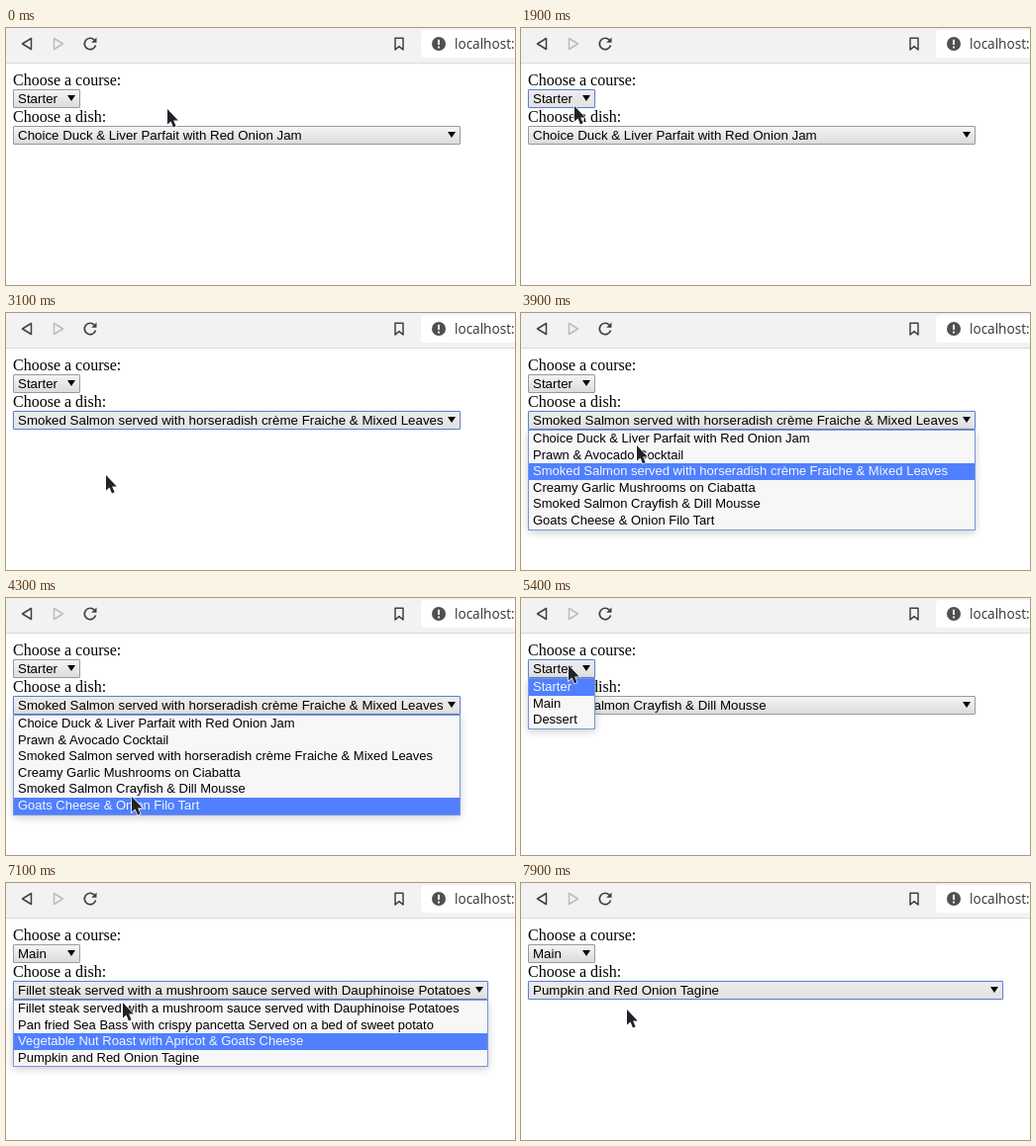
Write an HTML page that moves like this. It is 514 px wide and 260 px high and loops after 8 s.

```html
<!DOCTYPE html>
<html lang="en">
<head>
<meta charset="utf-8">
<title>Dependent menus</title>
<style>
html, body { margin: 0; width: 100%; height: 100%; overflow: hidden; background: #fff; }
body { position: relative; color: #000; }
body > * { position: absolute; }
#bar { left: 0; top: 0; }
#host { left: 453px; top: 6px; font: 13.6px/20px "Open Sans", sans-serif; color: #333; white-space: nowrap; }
.label { left: 7px; font: 16px/18px "Liberation Serif", serif; white-space: nowrap; }
.select, .popup { left: 7px; box-sizing: border-box; white-space: nowrap; font-family: "Liberation Sans", sans-serif; }
.select {
  height: 19px; padding-left: 4px; font-size: 13.333px; line-height: 17px;
  border: 1px solid #999; border-radius: 1px;
  background: linear-gradient(#f4f4f4, #dcdcdc);
}
.select.hover { background: linear-gradient(#f8f8f8, #e3e3e3); }
.select.focus { border-color: #5f7fd0; box-shadow: 0 0 1px #6f8fe0; background: linear-gradient(#ececec, #e2e2e2); }
.select::after {
  content: ""; position: absolute; right: 4px; top: 5px; width: 8px; height: 6px;
  background: #000; clip-path: polygon(0 0, 100% 0, 50% 100%);
}
.popup {
  border: 1px solid #7c93d8; background: #f7f7f7; font-size: 13px;
  box-shadow: 0 2px 8px rgba(0, 0, 0, .2);
}
.popup div { height: 16.6px; line-height: 16.6px; padding-left: 4px; }
.popup .on { background: #5080ff; color: #f4f6ff; }
#cursor { left: 0; top: 0; overflow: visible; }
</style>
</head>
<body>
<svg id="bar" width="514" height="36" fill="none" stroke="#404040" stroke-width="1.5">
  <path d="M0 0H514V35H0Z" fill="#f2f2f2" stroke="none"/>
  <path d="M514 2H423q-4 0 -4 4V26q0 4 4 4H514Z" fill="#fff" stroke="none"/>
  <path d="M0 35.5H514" stroke="#d9d9d9" stroke-width="1"/>
  <path d="M25.5 10.5V21.5L16.5 16Z" stroke-linejoin="round"/>
  <path d="M48.5 10.5V21.5L57.5 16Z" stroke="#bcbcbc" stroke-linejoin="round"/>
  <path d="M89.3 12.2A5.7 5.7 0 1 0 90.5 17.5" stroke-width="1.7"/>
  <path d="M91.5 9.5V14.8H86.2Z" fill="#404040" stroke="none"/>
  <path d="M393 10.2H401V22L397 18.6L393 22Z" stroke-linejoin="round"/>
  <circle cx="437" cy="16" r="7" fill="#505050" stroke="none"/>
  <path d="M437 11.8V17M437 18.6V20.4" stroke="#fff" stroke-width="1.8"/>
</svg>
<div id="host">localhost:</div>
<div class="label" style="top:44px">Choose a course:</div>
<div class="label" style="top:81px">Choose a dish:</div>
<div class="select" style="top:62px"></div>
<div class="select" style="top:99px"></div>
<div class="popup"></div>
<svg id="cursor" width="12" height="20">
  <path d="M0 0V15.6L3.5 12.4L6 18.4L8.6 17.3L6.1 11.5H10.8Z" fill="#20242a" stroke="#fff" stroke-width="1.4" paint-order="stroke"/>
</svg>
<script>
const courses = ["Starter", "Main", "Dessert"];
const menus = [
  ["Choice Duck & Liver Parfait with Red Onion Jam", "Prawn & Avocado Cocktail",
   "Smoked Salmon served with horseradish crème Fraiche & Mixed Leaves",
   "Creamy Garlic Mushrooms on Ciabatta", "Smoked Salmon Crayfish & Dill Mousse",
   "Goats Cheese & Onion Filo Tart"],
  ["Fillet steak served with a mushroom sauce served with Dauphinoise Potatoes",
   "Pan fried Sea Bass with crispy pancetta Served on a bed of sweet potato",
   "Vegetable Nut Roast with Apricot & Goats Cheese", "Pumpkin and Red Onion Tagine"]
];
const dishWidths = [452, 480], tops = [62, 99];
const STEP = 100, LOOP = 8000, NONE = -1;

// Pointer stops: step, x, y
const path = [
  [0, 163, 82], [4, 163, 82], [7, 150, 111], [10, 110, 100], [13, 81, 70], [14, 49, 70],
  [15, 49, 70], [17, 54, 79], [19, 54, 79], [24, 84, 102], [25, 84, 102], [26, 85, 111],
  [27, 85, 111], [31, 101, 164], [32, 101, 164], [36, 112, 110], [37, 112, 110],
  [41, 122, 158], [43, 127, 201], [44, 127, 201], [45, 126, 192], [49, 126, 192],
  [54, 48, 68], [55, 48, 68], [57, 74, 104], [58, 74, 104], [63, 116, 110], [70, 116, 110],
  [71, 118, 121], [73, 114, 167], [76, 114, 167], [78, 109, 108], [79, 107, 128], [80, 107, 128]
];

const start = { focus: NONE, open: NONE, row: 0, course: 0, dish: 0 };
const events = [
  [14, { focus: 0, open: 0 }], [19, { open: NONE }],
  [24, { focus: 1, open: 1 }], [28, { row: 1 }], [29, { row: 2 }], [31, { open: NONE, dish: 2 }],
  [37, { open: 1 }], [41, { row: 3 }], [42, { row: 4 }], [43, { row: 5 }], [45, { row: 4 }],
  [48, { open: NONE, dish: 4 }],
  [54, { focus: 0, open: 0, row: 0 }], [56, { row: 1 }], [59, { open: NONE, course: 1, dish: 0 }],
  [66, { focus: 1, open: 1, row: 0 }], [71, { row: 2 }], [72, { row: 3 }],
  [75, { open: NONE, dish: 3 }]
];

const selects = document.querySelectorAll(".select");
const popup = document.querySelector(".popup");
const cursor = document.getElementById("cursor");

function pointerAt(step) {
  const i = path.findIndex(p => p[0] > step);
  const [s0, x0, y0] = path[i - 1], [s1, x1, y1] = path[i];
  const k = (step - s0) / (s1 - s0);
  return [Math.round(x0 + (x1 - x0) * k), Math.round(y0 + (y1 - y0) * k)];
}

function draw(step) {
  const state = { ...start };
  for (const [at, change] of events) if (at <= step) Object.assign(state, change);
  const [x, y] = pointerAt(step);
  const lists = [courses, menus[state.course]];
  const widths = [68, dishWidths[state.course]];
  const chosen = [state.course, state.dish];

  selects.forEach((el, i) => {
    const inside = x >= 7 && x < 7 + widths[i] && y >= tops[i] && y < tops[i] + 19;
    el.textContent = lists[i][chosen[i]];
    el.style.width = widths[i] + "px";
    el.classList.toggle("focus", state.focus === i);
    el.classList.toggle("hover", inside);
  });

  popup.hidden = state.open === NONE;
  if (!popup.hidden) {
    popup.style.top = tops[state.open] + 19 + "px";
    popup.style.width = widths[state.open] + "px";
    popup.replaceChildren(...lists[state.open].map((text, i) => {
      const row = document.createElement("div");
      row.textContent = text;
      if (i === state.row) row.className = "on";
      return row;
    }));
  }
  cursor.style.transform = `translate(${x}px, ${y}px)`;
}

let last = NONE;
const origin = performance.now();
function frame() {
  const step = Math.floor((performance.now() - origin) % LOOP / STEP);
  if (step !== last) draw(last = step);
  requestAnimationFrame(frame);
}
frame();
</script>
</body>
</html>
```
